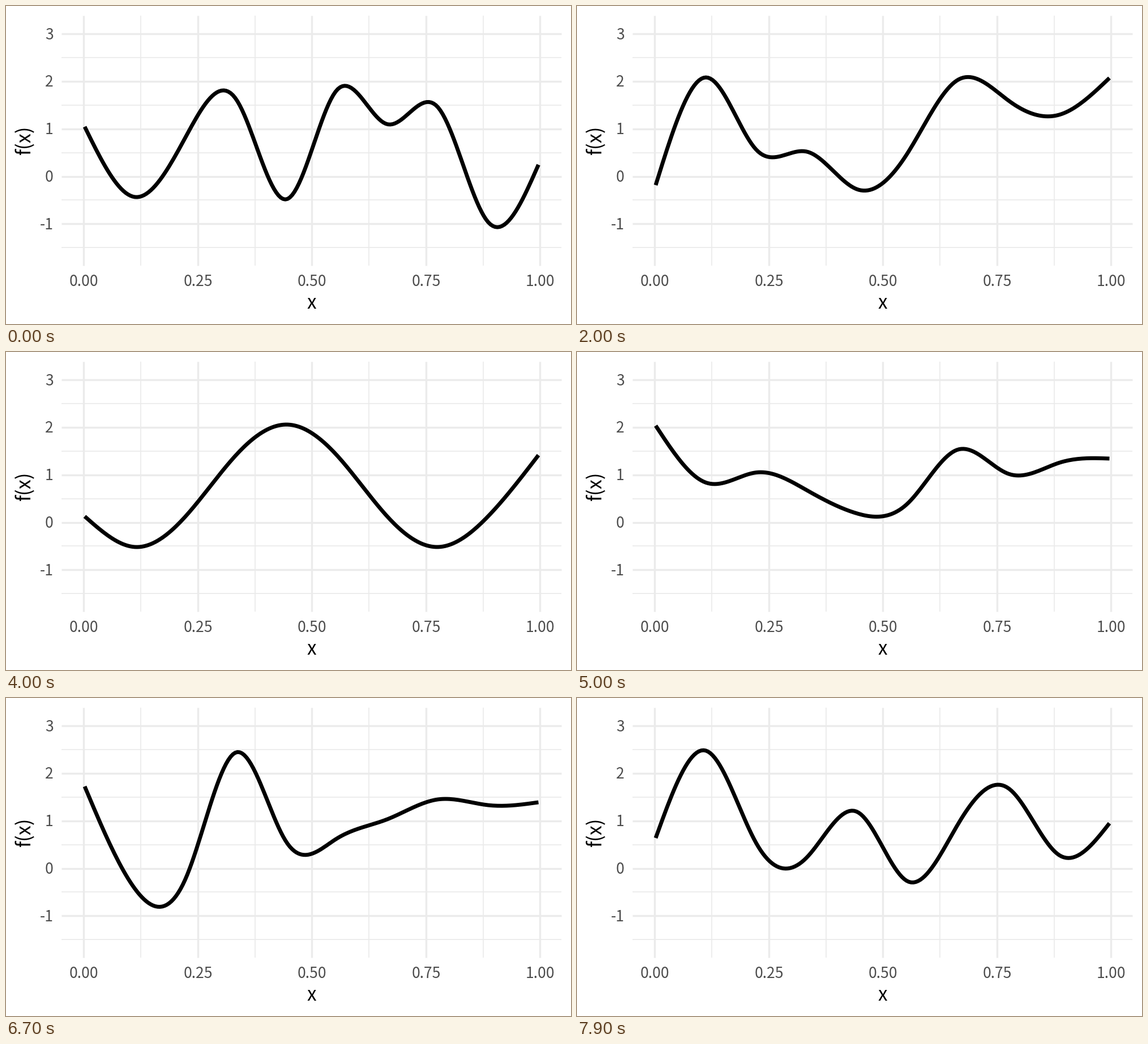
Write a matplotlib script that moves like this. It is 998 by 561 pixels and loops after 8 s.

```python
import numpy as np
import matplotlib.pyplot as plt
from matplotlib.animation import FuncAnimation

W, H, DPI = 998, 561, 100
PT = 72 / DPI
LEFT, RIGHT = 139, 940.5
KNOTS = np.arange(10)
FONT = "Noto Sans CJK JP"


def spline_matrix(count):
    """Matrix from knot heights to a natural cubic spline at even samples."""
    n = len(KNOTS)
    eye = np.eye(n)
    system, second = eye.copy(), np.zeros((n, n))
    for k in range(1, n - 1):
        system[k, k - 1:k + 2] = 1, 4, 1
        second[k, k - 1:k + 2] = 6, -12, 6
    bend = np.linalg.solve(system, second)

    t = np.linspace(0, n - 1, count)
    k = np.minimum(t.astype(int), n - 2)
    u = (t - k)[:, None]
    v = 1 - u
    return (v * eye[k] + u * eye[k + 1]
            + (v**3 - v) / 6 * bend[k] + (u**3 - u) / 6 * bend[k + 1])


# Each shape is a smooth curve through ten evenly spaced heights in pixels.
double_hump = np.array([213, 337, 231.5, 164, 341, 148.5, 208.5, 178, 381, 280])
late_peak = np.array([183, 158.7, 112.5, 236, 109.5, 336, 279, 208, 77.7, 290])
early_peak = np.array([316, 126, 254, 257, 323.5, 259, 130, 167, 192, 127])
gentle = np.array([222, 244, 273, 154, 239, 223, 248, 291.5, 202, 297])
swell = 236 - 108 * np.cos(np.pi * (KNOTS - 4) / 3)
shallow = np.array([130, 230.5, 212.5, 244, 285, 267, 172, 215, 195.5, 188])
steep = np.array([156, 337, 319, 96, 254, 248, 214, 179, 189, 184])
waves = np.array([247, 93, 257, 281, 201, 323.5, 222, 159.5, 277, 221])

dip = 58 * np.exp(-((KNOTS - 1.5) / 0.8)**2)
deep, raised = steep + dip, steep - dip
# The loop is cut at 5/6 of the last change, where the shape is "waves".
beyond = raised + 6 / 5 * (waves - raised)

STATES = [double_hump, late_peak, early_peak, gentle, swell, shallow,
          deep, raised, beyond]

xs = np.linspace(LEFT, RIGHT, 200)
SAMPLER = spline_matrix(len(xs))


def px(x):
    return 137.5 + 806 * x


def py(y):
    return 300.5 - 83.8 * y


fig = plt.figure(figsize=(W / DPI, H / DPI), dpi=DPI, facecolor="white")
ax = fig.add_axes([0, 0, 1, 1])
ax.set_xlim(0, W)
ax.set_ylim(H, 0)
ax.axis("off")


def grid(xvals, yvals, width):
    style = dict(color="#ebebeb", lw=width * PT, solid_capstyle="butt")
    for y in yvals:
        ax.plot([98.5, 981], [py(y)] * 2, **style)
    for x in xvals:
        ax.plot([px(x)] * 2, [17, 458], **style)


def label(x, y, text, size, color, **kw):
    ax.text(x, y, text, fontsize=size * PT, color=color, family=FONT,
            va="baseline", **kw)


grid(np.arange(0.125, 1, 0.25), np.arange(-1.5, 3, 1), 1.7)
grid(np.arange(0, 1.1, 0.25), range(-1, 4), 3.4)

for x in np.arange(0, 1.1, 0.25):
    label(px(x), 493.5, f"{x:.2f}", 26.5, "#4d4d4d", ha="center")
for y in range(-1, 4):
    label(83.5, py(y) + 9.5, str(y), 26.5, "#4d4d4d", ha="right")
label(539.5, 534, "x", 33.3, "black", ha="center")
label(43, 236, "f(x)", 34.5, "black", ha="center", rotation=90,
      rotation_mode="anchor")

line, = ax.plot([], [], color="black", lw=6.9 * PT, solid_capstyle="butt",
                solid_joinstyle="round")


def update(frame):
    state, step = divmod(frame, 10)
    hold = 3 if state == 0 else 4
    mix = max(0, (step - hold) / (10 - hold))
    heights = (1 - mix) * STATES[state] + mix * STATES[state + 1]
    line.set_data(xs, SAMPLER @ heights)
    return line,


anim = FuncAnimation(fig, update, frames=80, interval=100, repeat=True,
                     repeat_delay=0, blit=False)
plt.show()
```
